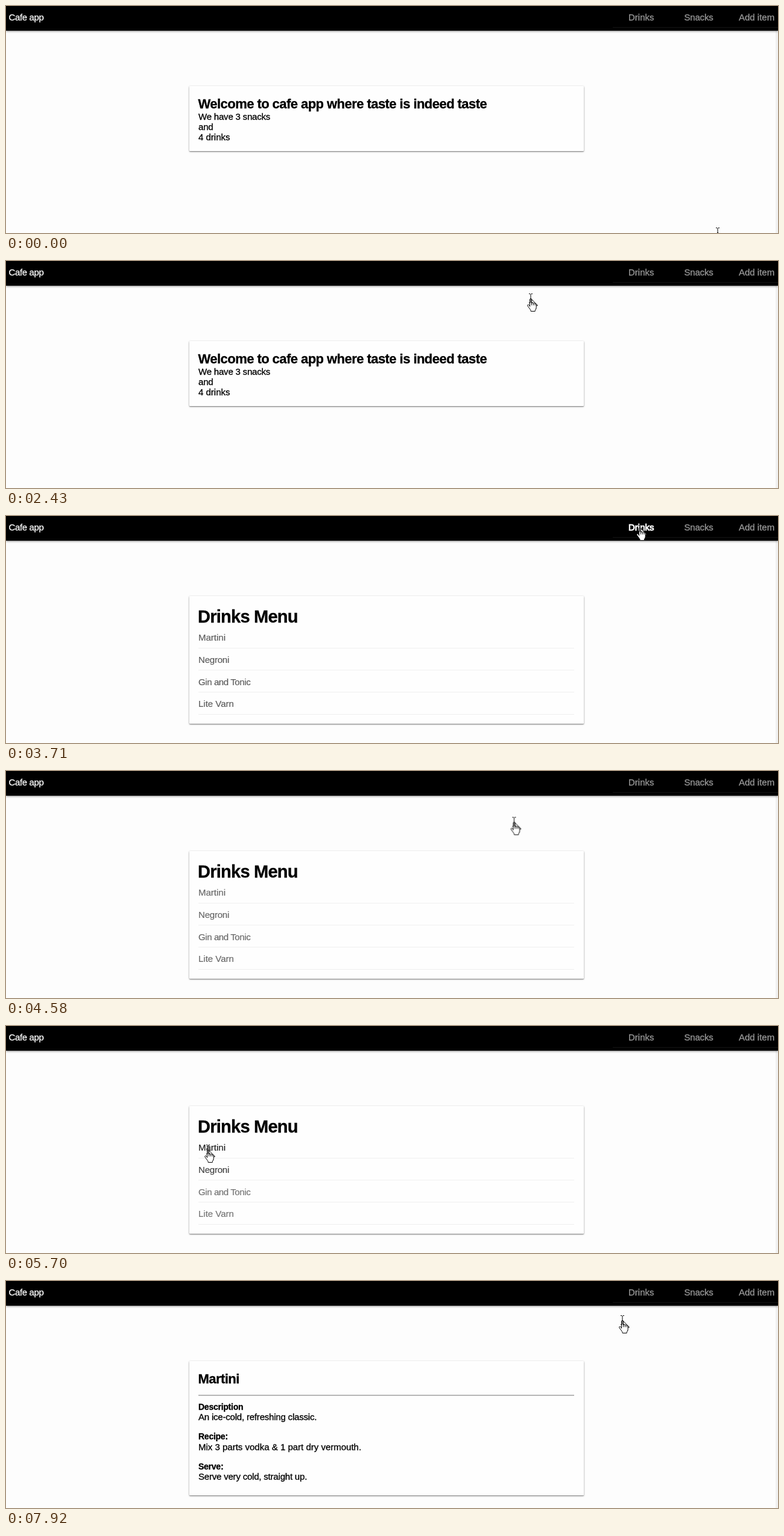
An HTML page for the animation above (8000 ms loop, 1280x377 px).

```html
<!DOCTYPE html>
<html lang="en">
<head>
<meta charset="utf-8">
<title>Cafe app</title>
<style>
html, body { margin: 0; width: 100%; height: 100%; overflow: hidden; background: #fdfdfd; }
#stage { position: relative; width: 1280px; height: 377px; overflow: hidden; }
#stage > * { position: absolute; }
#bar { left: 0; top: 0; width: 1280px; height: 41px; background: #000; box-shadow: 0 1px 3px rgba(0,0,0,.5); }
#line { left: 1006px; top: 35px; width: 274px; height: 1px; background: #141414; }
#scroll { left: 1276px; top: 41px; width: 4px; height: 336px; background: #f1f1f1; }
#card { left: 303.5px; top: 133px; width: 654px; background: #fefefe; border-radius: 1px;
  box-shadow: 0 1px 3px rgba(0,0,0,.4), 0 1px 1px rgba(0,0,0,.25); }
svg { left: 0; top: 0; width: 1280px; height: 377px; }

text { font: 15px "Liberation Sans", Arial, sans-serif; letter-spacing: -.2px; white-space: pre;
  fill: currentColor; stroke: currentColor; stroke-width: .3px; }
.nav { color: #989898; }
.brand { color: #fff; letter-spacing: -.35px; }
.loose { letter-spacing: 0; }
.tight { letter-spacing: -.4px; }
.h1 { font-size: 29px; font-weight: bold; letter-spacing: -.75px; }
.h2 { font-size: 22px; font-weight: bold; letter-spacing: -.55px; }
.b { font-size: 14px; font-weight: bold; letter-spacing: -.25px; }
.list text { stroke-width: .2px; }
.cursor path { fill: #fff; stroke: #000; stroke-linejoin: round; }
.cursor .thin { fill: none; }

/* One shared 8 s clock */
#card, #drinks, .page, .list, .martini, .negroni, .cursor, .cursor > g { animation: 8s linear infinite; }
#card, .page, .cursor > g { animation-timing-function: step-end; }

#card { animation-name: grow; }
@keyframes grow {
  0% { height: 108px; }
  46.35% { height: 212px; }
  75.6%, 100% { height: 223px; }
}

.home { animation-name: home; }
.menu { animation-name: menu; }
.detail { animation-name: detail; }
@keyframes home { 0% { visibility: visible; } 46.35%, 100% { visibility: hidden; } }
@keyframes menu { 0%, 75.6%, 100% { visibility: hidden; } 46.35% { visibility: visible; } }
@keyframes detail { 0% { visibility: hidden; } 75.6%, 100% { visibility: visible; } }

#drinks { animation-name: focus; }
.list { animation-name: soften; }
.martini { animation-name: martini; }
.negroni { animation-name: negroni; }
@keyframes focus {
  0%, 40%, 57%, 100% { color: #989898; stroke-width: .3px; }
  43%, 55% { color: #fff; stroke-width: .95px; }
}
@keyframes soften { 0%, 54.75% { color: #5c5c5c; } 59.75%, 100% { color: #747474; } }
@keyframes martini {
  0%, 54.75% { color: #5c5c5c; }
  59.75%, 67.4% { color: #747474; }
  62.4% { color: #5a5a5a; }
  71%, 100% { color: #202020; }
}
@keyframes negroni {
  0%, 54.75% { color: #5c5c5c; }
  59.75%, 61.6%, 75%, 100% { color: #747474; }
  63.1%, 67.4% { color: #101010; }
}

/* The pointer rests at each stop, then glides to the next in small jumps */
.cursor { animation-name: travel; }
@keyframes travel {
  0%, 13.12% { transform: translate(1180px, 376px); animation-timing-function: steps(4, start); }
  16.29%, 18.25% { transform: translate(992px, 112px); animation-timing-function: steps(7, start); }
  24.96%, 26.37% { transform: translate(640px, 46px); animation-timing-function: steps(3, start); }
  28.87% { transform: translate(492px, 46px); animation-timing-function: steps(3, start); }
  31.1%, 33.75% { transform: translate(870px, 62px); animation-timing-function: steps(11, start); }
  43.37%, 54.75% { transform: translate(1051px, 19px); animation-timing-function: steps(10, start); }
  64.25% { transform: translate(356px, 237px); animation-timing-function: steps(2, start); }
  65.75%, 67.37% { transform: translate(331px, 223px); animation-timing-function: steps(6, start); }
  71.87%, 73.25% { transform: translate(335px, 205px); animation-timing-function: steps(2, start); }
  75.5%, 86.45% { transform: translate(339px, 212px); animation-timing-function: steps(1, start); }
  87.4% { transform: translate(371px, 205.5px); animation-timing-function: steps(8, start); }
  94.75%, 97.25% { transform: translate(826px, 112px); animation-timing-function: steps(3, start); }
  99.7%, 100% { transform: translate(1022px, 65px); }
}

.arrow { animation-name: arrow; }
.hand { animation-name: hand; }
.beam { animation-name: beam; }
@keyframes arrow {
  0%, 40.75%, 62.35% { visibility: hidden; }
  9%, 54.75%, 87.4%, 100% { visibility: visible; }
}
@keyframes hand {
  0%, 54.75%, 86.45%, 100% { visibility: hidden; }
  40.75%, 62.35% { visibility: visible; }
}
@keyframes beam {
  0%, 87.4%, 100% { visibility: hidden; }
  86.45% { visibility: visible; }
}
</style>
</head>
<body>
<div id="stage">
  <div id="scroll"></div>
  <div id="bar"></div>
  <div id="line"></div>
  <div id="card"></div>
  <svg viewBox="0 0 1280 377">
    <g class="nav">
      <text class="brand" x="4.5" y="24">Cafe app</text>
      <text class="loose" id="drinks" x="1032" y="24">Drinks</text>
      <text x="1124.5" y="24">Snacks</text>
      <text class="loose" x="1215" y="24">Add item</text>
    </g>
    <g class="page home">
      <text class="h2" x="318.5" y="170">Welcome to cafe app where taste is indeed taste</text>
      <text x="319" y="188.5">We have 3 snacks</text>
      <text x="319" y="206">and</text>
      <text class="loose" x="319" y="223">4 drinks</text>
    </g>
    <g class="page menu">
      <text class="h1" x="318" y="177">Drinks Menu</text>
      <g class="list">
        <text class="loose martini" x="319" y="207">Martini</text>
        <text class="negroni" x="319" y="244">Negroni</text>
        <text class="tight" x="319" y="280.5">Gin and Tonic</text>
        <text class="loose" x="319" y="317">Lite Varn</text>
      </g>
      <path d="M319 219.5H942M319 256H942M319 292.5H942M319 329.5H942" stroke="#efefef"/>
    </g>
    <g class="page detail">
      <text class="h2" x="318.5" y="170">Martini</text>
      <path d="M319 189.7H942" stroke="#a0a0a0" stroke-width="1.4"/>
      <text class="b" x="319" y="213.5">Description</text>
      <text x="319" y="230.5">An ice-cold, refreshing classic.</text>
      <text class="b" x="319" y="263">Recipe:</text>
      <text class="loose" x="319" y="280.5">Mix 3 parts vodka &amp; 1 part dry vermouth.</text>
      <text class="b" x="319" y="313">Serve:</text>
      <text x="319" y="330">Serve very cold, straight up.</text>
    </g>
    <g class="cursor">
      <g class="arrow"><path d="M.5 .5V16.3L4.2 12.9 6.7 18.5 9 17.5 6.6 12H11.5z"/></g>
      <g class="hand"><g transform="translate(-6 0)">
        <path d="M4.6 13.5V2q0-1.5 1.5-1.5T7.6 2v6q0-1 1.3-1t1.5 1.5q0-.8 1.2-.8t1.4 1.5q.2-.6 1-.6 1.2 0 1.2 1.6V15q0 2-1.2 3.5-.8 1-.8 3H6.2q0-2-1.2-3.3L1.2 13q-1-1.4 0-2.2t2.3.5z"/>
        <path class="thin" d="M7.6 8v3.5M10.4 8.5v3M13 9.5v2"/>
      </g></g>
      <g class="beam"><path class="thin" d="M-3-7.5h2L0-6.5 1-7.5h2M0-6.5V6.5M-3 7.5h2L0 6.5 1 7.5h2"/></g>
    </g>
  </svg>
</div>
</body>
</html>
```
